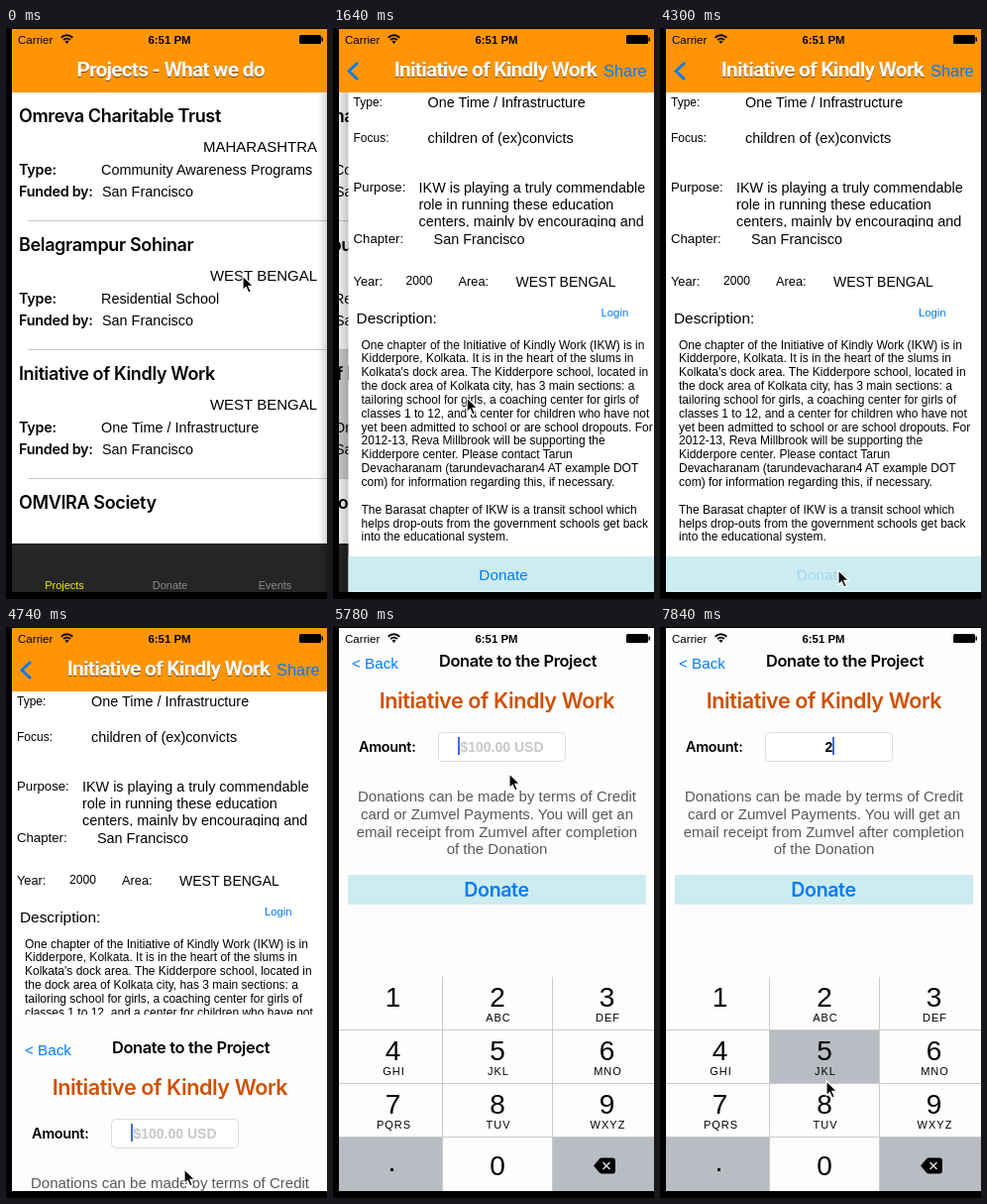
Animation, 324 px wide and 576 px high, one loop 7990 ms. Source, as an HTML page:

```html
<!DOCTYPE html>
<html lang="en">
<head>
<meta charset="utf-8">
<title>Donation app</title>
<style>
html, body { margin: 0; width: 100%; height: 100%; overflow: hidden; background: #000; }
svg { display: block; width: 324px; height: 576px; }
text { font-family: "Liberation Sans", Arial, sans-serif; white-space: pre; }
.med { font-family: Inter, "Liberation Sans", sans-serif; font-weight: 600; letter-spacing: -.02em; }
.bold { font-weight: 700; }
.nav { font-family: Roboto, "Liberation Sans", sans-serif; font-weight: 700; letter-spacing: -.8px; }
</style>
</head>
<body>
<svg id="stage" viewBox="0 0 324 576"></svg>
<script>
const LOOP = 7990, STEPS = 54;
const BLUE = '#007aff', ORANGE = '#ff9505', AQUA = '#cdecef', KEY = '#b9bcc2';
const ORG = 'Initiative of Kindly Work';

const text = (x, y, size, str, o = {}) =>
  `<text x="${x}" y="${y}" font-size="${size}" class="${o.cls || ''}" fill="${o.fill || '#000'}"` +
  ` text-anchor="${o.anchor || 'start'}"${o.gap ? ` letter-spacing="${o.gap}"` : ''}` +
  `${o.id ? ` id="${o.id}"` : ''}>${str}</text>`;
const rect = (x, y, w, h, fill, extra = '') =>
  `<rect x="${x}" y="${y}" width="${w}" height="${h}" fill="${fill}" ${extra}/>`;
const group = (id, body, extra = '') => `<g id="${id}" ${extra}>${body}</g>`;
const lines = (x, y, lead, size, rows, o) =>
  rows.map((s, i) => text(x, y + i * lead, size, s, o)).join('');
const mid = (fill, cls) => ({ anchor: 'middle', fill, cls });

const navTitle = (x, str) =>
  text(x, 50, 21, str, mid('#7a4300', 'nav')) + text(x, 49, 21, str, mid('#fff', 'nav'));

function listPage() {
  const rows = [
    ['Omreva Charitable Trust', 'MAHARASHTRA', 'Community Awareness Programs'],
    ['Belagrampur Sohinar', 'WEST BENGAL', 'Residential School'],
    [ORG, 'WEST BENGAL', 'One Time / Infrastructure'],
    ['OMVIRA Society', '', '']
  ];
  let s = rect(6, 65, 318, 505, '#fff') + rect(6, 325, 318, 130, '#d3d3d3', 'id="picked"');
  rows.forEach(([name, state, type], i) => {
    const y = 65 + i * 130;
    s += text(13, y + 30, 18, name, { cls: 'med' });
    if (!type) return;
    s += text(314, y + 60, 15, state, { anchor: 'end' }) +
      text(13, y + 83, 14.4, 'Type:', { cls: 'med' }) + text(96, y + 83, 14.4, type) +
      text(13, y + 105, 14.4, 'Funded by:', { cls: 'med' }) + text(97, y + 105, 14.4, 'San Francisco') +
      rect(22, y + 129, 302, 1, '#c8c8cc');
  });
  s += rect(6, 520, 318, 50, '#252525') + text(59, 566, 11, 'Projects', mid('#e8f000')) +
    text(165.5, 566, 11, 'Donate', mid('#8c8c8c')) + text(271.5, 566, 11, 'Events', mid('#8c8c8c'));
  return s + rect(6, 65, 318, 505, '#000', 'id="dim"');
}

function detailPage() {
  return rect(-3, 65, 9, 505, 'url(#edge)') + rect(6, 65, 318, 505, '#fff') +
    text(11, 79, 12, 'Type:') + text(86, 80, 14.4, 'One Time / Infrastructure') +
    text(11, 115, 12, 'Focus:') + text(86, 116, 14.4, 'children of (ex)convicts') +
    text(11, 165, 13.2, 'Purpose:') +
    group('purpose', lines(77, 166, 17, 14.4, [
      'IKW is playing a truly commendable',
      'role in running these education',
      'centers, mainly by encouraging and']), 'clip-path="url(#purposeBox)"') +
    text(11, 217, 13.2, 'Chapter:') + text(92, 218, 14.4, 'San Francisco') +
    text(11, 260, 12.8, 'Year:') + text(64, 259, 12.1, '2000') +
    text(117, 260, 12.8, 'Area:') + text(175, 261, 14, 'WEST BENGAL') +
    text(261, 291, 11.3, 'Login', { fill: BLUE }) + text(14, 298, 15.4, 'Description:') +
    lines(19, 323.5, 13.85, 12, [
      `One chapter of the ${ORG} (IKW) is in`,
      'Kidderpore, Kolkata. It is in the heart of the slums in',
      "Kolkata's dock area. The Kidderpore school, located in",
      'the dock area of Kolkata city, has 3 main sections: a',
      'tailoring school for girls, a coaching center for girls of',
      'classes 1 to 12, and a center for children who have not',
      'yet been admitted to school or are school dropouts. For',
      '2012-13, Reva Millbrook will be supporting the',
      'Kidderpore center. Please contact Tarun',
      'Devacharanam (tarundevacharan4 AT example DOT',
      'com) for information regarding this, if necessary.',
      '',
      'The Barasat chapter of IKW is a transit school which',
      'helps drop-outs from the government schools get back',
      'into the educational system.']) +
    rect(6, 533, 318, 37, AQUA) +
    text(162.5, 557, 15.3, 'Donate', { ...mid(BLUE), id: 'give' });
}

function keypad() {
  const letters = ['', 'ABC', 'DEF', 'GHI', 'JKL', 'MNO', 'PQRS', 'TUV', 'WXYZ'];
  const cx = [60.5, 166, 276.5], left = [6, 111, 222], wide = [104, 110, 102];
  let s = rect(6, 353, 318, 217, '#c9cace');
  for (let i = 0; i < 12; i++) {
    const c = i % 3, y = 353 + 54 * Math.floor(i / 3);
    const grey = i === 9 || i === 11;
    s += rect(left[c], y, wide[c], i > 8 ? 55 : 53, grey ? KEY : '#fdfdfd', `id="key${i + 1}"`);
    if (i < 9) s += text(cx[c], y + 30, 28, i + 1, mid()) +
      text(cx[c] + 1, y + 45, 11, letters[i], { anchor: 'middle', gap: 1 });
  }
  return s + text(166, 553, 28, '0', mid()) + rect(58, 546, 3, 3, '#000') +
    '<path d="M263 543.5l6-7q1-1 2-1h11q3 0 3 3v10q0 3-3 3h-11q-1 0-2-1z"/>' +
    '<path d="M272.5 540l7 7m0-7l-7 7" stroke="#d8d9dc" stroke-width="1.5"/>';
}

function donatePage() {
  return rect(6, 1, 318, 569, '#fdfdfd') +
    text(19, 42, 15.2, '&lt; Back', { fill: BLUE }) +
    text(186.5, 40, 16.4, 'Donate to the Project', mid('#000', 'med')) +
    text(165.5, 82, 21.6, ORG, mid('#d05000', 'med')) +
    text(26, 126, 14.4, 'Amount:', { cls: 'med' }) +
    rect(106.5, 106.5, 128, 29, '#fff', 'rx="4" stroke="#dcdcdc"') +
    text(170.5, 126, 14, '$100.00 USD', { ...mid('#c7c7cc', 'bold'), id: 'hint' }) +
    text(170.5, 126, 14, '2', { ...mid('#000', 'bold'), id: 'amount' }) +
    rect(126, 111, 2, 18, '#4068ee', 'id="caret"') +
    lines(165.5, 176, 17.8, 15, [
      'Donations can be made by terms of Credit',
      'card or Zumvel Payments. You will get an',
      'email receipt from Zumvel after completion',
      'of the Donation'], mid('#58585a')) +
    rect(15, 250, 301, 30, AQUA) + text(165, 272, 19.6, 'Donate', mid(BLUE, 'med')) + keypad();
}

const arc = r => {
  const d = r * .72;
  return `<path d="M${61.5 - d} ${15.5 - d}A${r} ${r} 0 0 1 ${61.5 + d} ${15.5 - d}" fill="none" stroke="#000" stroke-width="1.9"/>`;
};
const statusBar = text(12, 15.5, 11.6, 'Carrier') +
  text(165, 15.5, 11.4, '6:51 PM', mid('#000', 'bold')) +
  arc(8) + arc(4.8) + '<path d="M61.5 16l-2-2.5q2-1.5 4 0z"/>' +
  rect(296, 7, 22, 9, '#000', 'rx="1.5"') + rect(318.5, 9.5, 1.5, 4, '#000');

const stage = document.getElementById('stage');
stage.innerHTML =
  '<clipPath id="screen"><rect x="6" y="1" width="318" height="568"/></clipPath>' +
  '<clipPath id="purposeBox"><rect x="70" y="150" width="254" height="51"/></clipPath>' +
  '<linearGradient id="edge"><stop stop-opacity="0"/><stop offset="1" stop-opacity=".16"/></linearGradient>' +
  group('app', group('list', listPage()) + group('detail', detailPage()) +
    rect(6, 1, 318, 64, ORANGE) +
    group('oldNav', navTitle(166, 'Projects - What we do')) +
    group('newNav', navTitle(164, ORG)) +
    `<path id="back" d="M25 35l-9 8.5 9 8.5" fill="none" stroke="${BLUE}" stroke-width="2.8"/>` +
    text(273, 49, 16.4, 'Share', { fill: BLUE, id: 'share' }) +
    group('modal', donatePage()) + statusBar, 'clip-path="url(#screen)"') +
  group('cursor', '<path d="M0 0v14.5l3.3-3.1 2.4 5.6 2.6-1.1-2.4-5.5h4.7z" stroke="#fff" stroke-width="1.2"/>');

const el = {};
stage.querySelectorAll('[id]').forEach(n => el[n.id] = n);

// Keys are [step, value, ...]; values are linear between keys.
const POINTER = [
  [0, 239, 250], [1, 200, 370], [2, 170, 443], [3, 170, 443], [6, 136, 373], [12, 135, 373],
  [16, 134, 233], [19, 130, 327], [21, 130, 342], [22, 130, 342], [26, 170, 558], [28, 180, 547],
  [34, 180, 547], [37, 178, 148], [44, 178, 148], [48, 164, 384], [50, 164, 384],
  [52, 167, 455], [53, 168, 458]
];
const PUSH = [[8, 0], [9, .261], [10, .76], [11, .97], [12, 1]];
const NAV = [[8, 0], [9, .261], [10, .8], [11, 1]];
const RISE = [[31, 576], [32, 390], [33, 82], [34, 8], [35, 0]];
const CARET = [[35, 1], [36, 0], [38, 0], [39, 1], [41, 1], [42, .5], [43, 0], [44, 0], [45, 1]];

function at(keys, k) {
  const i = keys.findIndex(key => key[0] > k);
  if (i === 0) return keys[0].slice(1);
  if (i < 0) return keys[keys.length - 1].slice(1);
  const a = keys[i - 1], b = keys[i], p = (k - a[0]) / (b[0] - a[0]);
  return a.slice(1).map((v, j) => v + (b[j + 1] - v) * p);
}
const move = (n, x, y) => n.setAttribute('transform', `translate(${x} ${y})`);
const fade = (n, o) => n.setAttribute('opacity', o);

function draw(k) {
  const [push] = at(PUSH, k), [nav] = at(NAV, k), [rise] = at(RISE, k);
  move(el.cursor, ...at(POINTER, k));
  move(el.list, -98 * push, 0);
  move(el.detail, 318 * (1 - push), 0);
  fade(el.dim, .08 * push);
  fade(el.picked, k >= 7 ? 1 : 0);
  move(el.oldNav, -28 * nav, 0);
  fade(el.oldNav, Math.max(0, 1 - 1.4 * nav));
  move(el.newNav, 290 * (1 - nav), 0);
  fade(el.newNav, nav);
  fade(el.back, nav * nav);
  fade(el.share, nav);
  fade(el.give, k >= 28 ? .2 : 1);
  move(el.modal, 0, rise);
  const typed = k >= 50;
  fade(el.hint, typed ? 0 : 1);
  fade(el.amount, typed ? 1 : 0);
  el.caret.setAttribute('x', typed ? 174 : 126);
  fade(el.caret, at(CARET, k)[0]);
  el.key2.setAttribute('fill', k === 49 ? KEY : '#fdfdfd');
  el.key5.setAttribute('fill', k === 53 ? KEY : '#fdfdfd');
}

function tick() {
  const t = performance.now() % LOOP;
  // Steps are rounded to 10 ms, so each may begin slightly early.
  draw(Math.min(STEPS - 1, Math.floor(t / LOOP * STEPS + .06)));
  requestAnimationFrame(tick);
}
tick();
</script>
</body>
</html>
```
